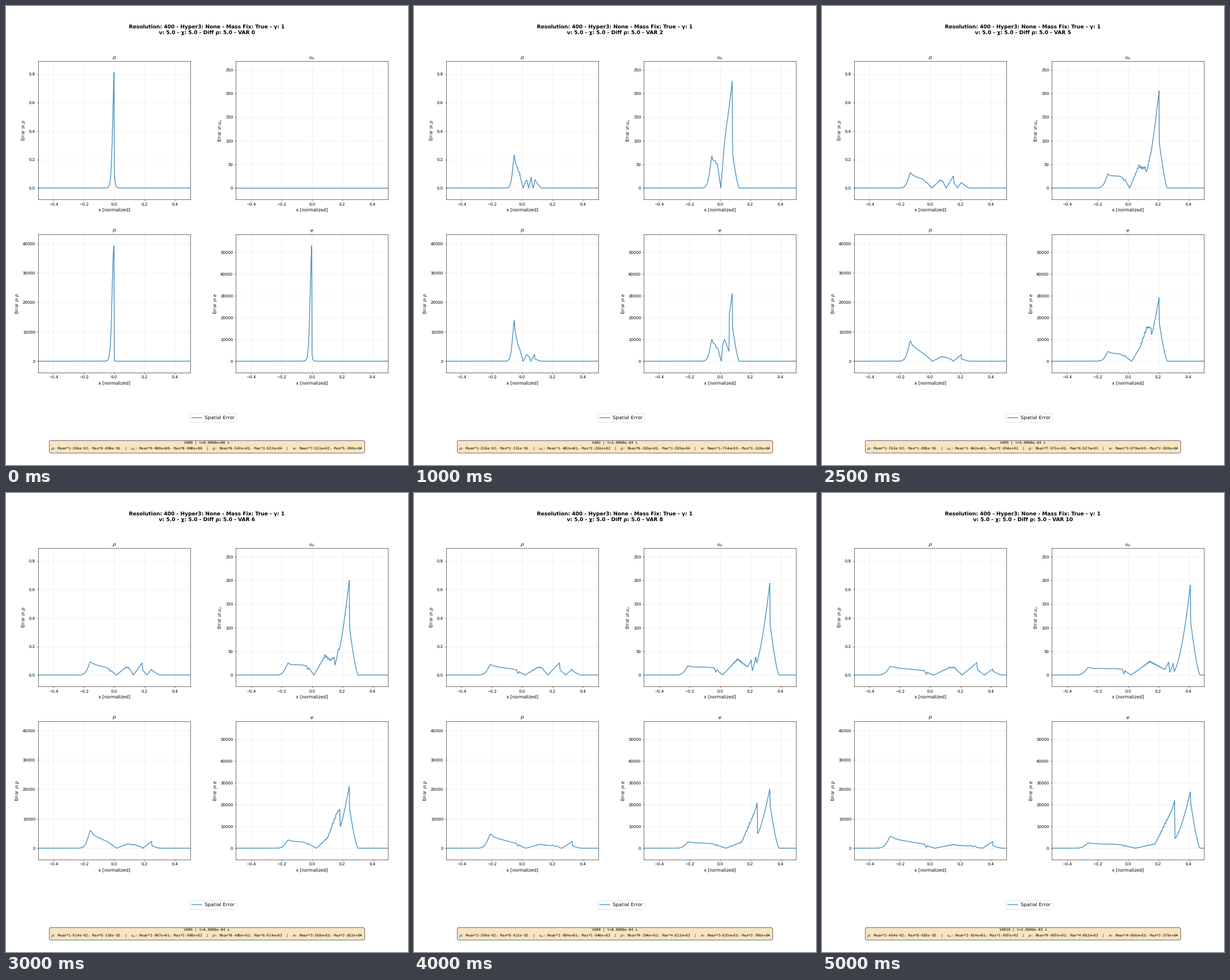
Write a matplotlib script that moves like this. It is 700x800 px and loops after 5500 ms.

```python
import numpy as np
import matplotlib.pyplot as plt
from matplotlib.animation import FuncAnimation

plt.rcParams["text.hinting"] = "none"

LOOP_MS, FRAMES = 5500, 11
X = np.linspace(-0.5, 0.5, 1601)
CELLS = np.linspace(-0.5, 0.5, 400)


def head(k):
    return -0.026 * k


def contact(k):
    return 0.0309 * k


def shock(k):
    return 0.0412 * k - 0.001


def ramp(x0, y0, x1, y1, power):
    v = np.linspace(0, 1, 15)
    return list(zip(x0 + (x1 - x0) * v, y0 + (y1 - y0) * v ** power))


def expansion(k, crest, falloff, dip, rebound, foot):
    """Fan from the wave head to the start, then a fixed notch beside it."""
    u, level = np.array([0, 0.12, 0.25, 0.5, 0.8, 1]), np.array(falloff)
    near = min(1, k / 3)
    end = -0.036 * near
    fan = zip(head(k) + (end - head(k)) * u, crest * level)
    notch = [(-0.027, min(dip, level[-1])), (-0.018, rebound), (-0.007, foot)]
    return [*fan, *((x * near, crest * y) for x, y in notch)]


def density(k):
    c, s = contact(k), shock(k)
    pts = expansion(k, 0.4127 * k ** -0.83, [1, 0.875, 0.79, 0.69, 0.6, 0.48],
                    max(0.06, 0.72 - 0.073 * k), 0.33, 0.19)
    pts += [(0.002 + 0.002 * k, 0), (0.0128 * k, 0.054), (0.016 * k, 0.052),
            (0.021 * k, 0), (c - 0.002, 0.09 - 0.03 / k), (c + 0.002, 0.036),
            (0.0357 * k, 0), (s, 0.045 - 0.025 / k)]
    return pts, 0.085 * k ** -0.5


def velocity(k):
    s = shock(k)
    pts = expansion(k, 127 * k ** -0.9, [1, 0.89, 0.87, 0.86, 0.84, 0.76],
                    0.94 - 0.08 * k, 0.6, 0.35)
    pts += [(0.002 + 0.002 * k, 0), (0.0145 * k, 150 * k ** -0.72)]
    pts += ramp((0.02 + 0.0009 * k) * k, 330 * np.exp(-k / 2.2),
                s, 244 * k ** -0.107, 1 + 0.08 * k)
    return pts, 58 + 54 * np.log10(k)


def pressure(k):
    bump = 3000 * k ** -0.4
    pts = expansion(k, 23920 * k ** -0.77, [1, 0.81, 0.7, 0.57, 0.43, 0.33],
                    0.48 - 0.043 * k, 0.23, 0.135)
    pts += [(0.003 * k, 0), (0.0148 * k, bump), (0.0245 * k, 0.6 * bump),
            ((0.0265 + 0.0008 * k) * k, 0), (shock(k), 2300)]
    return pts, 800


def energy(k):
    c, s = contact(k), shock(k)
    peak = 17800 * (1 - np.exp(-k / 2.4))
    x_peak = 0.029 * k * (1 - 0.52 * np.exp(-(k / 4.5) ** 3))
    pts = expansion(k, 18700 * k ** -0.89, [1, 0.9, 0.84, 0.8, 0.75, 0.62],
                    0.7 - 0.04 * k, 0.56, 0.35)
    pts += [(0.005 * k, 0),
            (0.62 * x_peak, peak * (0.1 + 0.8 * np.exp(-(k / 5) ** 2))),
            (x_peak, peak),
            (c - 0.002, 22200 * (1 - np.exp(-(k / 4.6) ** 1.8)))]
    pts += ramp(c + 0.001, 33000 * np.exp(-k / 5), s, 32500 - 660 * k, 1 + 0.04 * k)
    return pts, 14000 + 700 * k


# symbol, rule, y limit, tail (width, growth), tooth height, start (amplitude, ratio)
FIELDS = [
    (r"$\rho$", density, 0.8099, (0.0092, 0.40), 0, (1, 0.025)),
    ("$u_x$", velocity, 244.0, (0.0135, 0.22), 20, (0, 0.5)),
    ("$p$", pressure, 39220, (0.0100, 0.38), 400, (40000, 1.59e-4)),
    ("$e$", energy, 52900, (0.0135, 0.22), 0, (58948, 0.00636)),
]


def initial(amp, ratio):
    """Distance of a smoothed step (tanh in the logarithm) from the sharp one."""
    smooth = ratio ** ((1 + np.tanh(CELLS / 0.0125)) / 2)
    return amp * np.abs(smooth - np.where(CELLS < 0, 1, ratio))


def wiggle(y, k, tooth):
    """Ripples up to the contact and two saw teeth just before it."""
    c = contact(k)
    inside = np.clip((X - 0.003 * k) / (c - 0.003 * k), 0, 1)
    ripple = 0.06 * np.clip((k - 2) / 3, 0, 1) * np.sin(np.pi * inside)
    y = y * (1 + ripple * np.sin(2 * np.pi * X / 0.012))
    phase = (X - c + 0.004) / 0.03
    saw = np.interp(phase % 1, [0, 0.75, 1], [0, 1, 0]) * (np.abs(phase + 1) < 1)
    return y + tooth * np.clip((k - 4) / 3, 0, 1) * saw


def curve(field, k):
    _, rule, _, (width, growth), tooth, start = field
    if k == 0:
        return CELLS, initial(*start)
    pts, base = rule(k)
    px, py = np.transpose(pts)
    h, jump = head(k), shock(k) + 0.002
    end = shock(k) + 0.04 * k ** 0.2
    y = wiggle(np.interp(X, [*px, jump], [*py, base]), k, tooth)
    left = py[0] * 0.5 ** ((np.maximum(h - X, 0) / (width * k ** growth)) ** 1.5)
    right = base * np.clip((end - X) / (end - jump), 0, 1) ** 1.4
    return X, np.where(X < h, left, np.where(X > jump, right, y))


fig, axes = plt.subplots(2, 2, figsize=(14, 16), dpi=50)
fig.subplots_adjust(left=0.08, right=0.95, top=0.88, bottom=0.201,
                    wspace=0.3, hspace=0.25)

lines = []
for ax, (symbol, _, limit, *_) in zip(axes.flat, FIELDS):
    lines += ax.plot([], [], color="tab:blue", lw=2, alpha=0.8, label="Spatial Error")
    ax.set(xlim=(-0.5, 0.5), ylim=(-0.1 * limit, 1.1 * limit))
    ax.set_title(symbol, fontsize=12)
    ax.set_xlabel("x [normalized]", fontsize=11)
    ax.set_ylabel(f"Error in {symbol}", fontsize=11)
    ax.grid(alpha=0.3)

fig.legend(handles=lines[:1], loc="center", fontsize=12, bbox_to_anchor=(0.515, 0.103))
heading = fig.suptitle("", y=0.96, fontsize=13, fontweight="bold")
info = fig.text(0.5, 0.03, "", ha="center", va="bottom", fontsize=9,
                family="monospace",
                bbox=dict(boxstyle="round,pad=0.5", facecolor="wheat", alpha=0.8))


def update(k):
    stats = []
    for field, line in zip(FIELDS, lines):
        x, y = curve(field, k)
        line.set_data(x, y)
        stats.append(f"{field[0]}: Mean={y.mean():.3e}, Max={y.max():.3e}")
    heading.set_text("Resolution: 400 - Hyper3: None - Mass Fix: True - γ: 1\n"
                     f"ν: 5.0 - χ: 5.0 - Diff ρ: 5.0 - VAR {k}")
    info.set_text(f"VAR{k} | t={k * 1e-4:.4e} s\n" + "  |  ".join(stats))
    return [*lines, heading, info]


anim = FuncAnimation(fig, update, frames=FRAMES, interval=LOOP_MS / FRAMES,
                     repeat=True, repeat_delay=0, blit=False)
plt.show()
```
